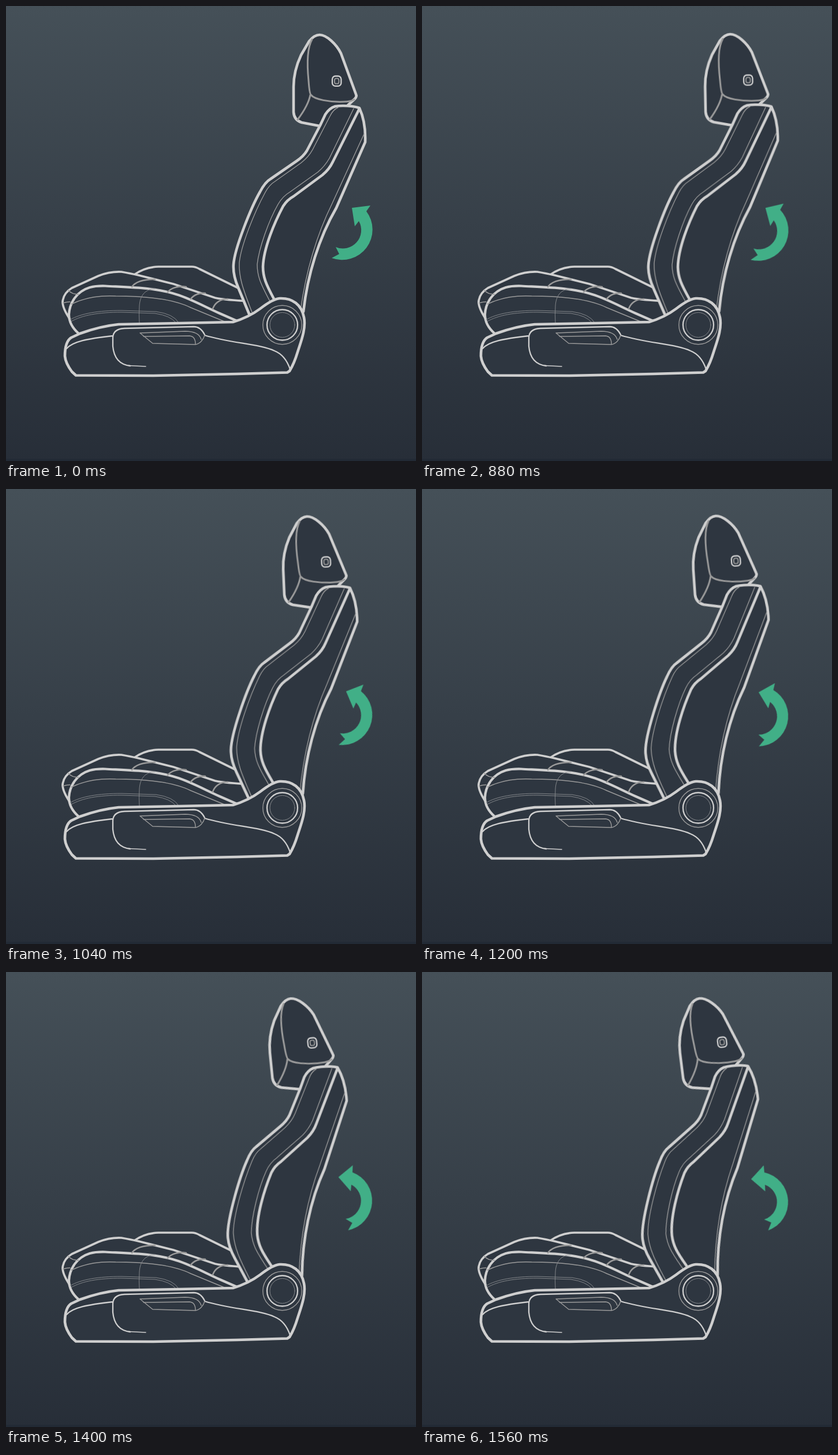
Recreate the animation shown at these times as an HTML page. Size 710 px wide and 789 px high, loop 2.08 s.

```html
<!DOCTYPE html>
<html lang="en">
<head>
<meta charset="utf-8">
<title>Seat recline</title>
<style>
  html, body { margin: 0; width: 100%; height: 100%; overflow: hidden; background: #272e38; }
  svg { display: block; width: 710px; height: 789px; }
  path, circle, rect { stroke-linecap: round; stroke-linejoin: round; }
  .line { fill: none; stroke: #cfcfcf; }
  .body { fill: #2e3640; stroke: #cfcfcf; }
  .thick { stroke-width: 4.6; }
  .mid { stroke-width: 3.7; }
  .fine { stroke-width: 2.3; }
  .seam { fill: none; stroke: #9a9a9a; stroke-width: 2.6; }
  .thin { fill: none; stroke: #9a9a9a; stroke-width: 1.4; }
  .hair { fill: none; stroke: #8d8f92; stroke-width: .9; }

  .back, .arrow { animation: 2080ms steps(20, end) infinite; }
  .back { transform-origin: 478px 553px; animation-name: recline; }
  .arrow { transform-origin: 584px 389.5px; animation-name: turn; }
  @keyframes recline {
    0%, 36.52% { transform: rotate(0deg); }
    74.98%, 100% { transform: rotate(-7.1deg); }
  }
  @keyframes turn {
    0%, 36.52% { transform: translateY(0) rotate(0deg); }
    74.98%, 100% { transform: translateY(9.5px) rotate(-40.3deg); }
  }
</style>
</head>
<body>
<svg viewBox="0 0 710 789">
  <defs>
    <linearGradient id="sky" x1="0" y1="0" x2="0" y2="1">
      <stop offset="0" stop-color="#455058"/>
      <stop offset="1" stop-color="#272e38"/>
    </linearGradient>
  </defs>
  <rect width="710" height="789" fill="url(#sky)"/>
  <rect y="785" width="710" height="4" fill="#222a35"/>

  <!-- cushion -->
  <path class="body mid" d="M222 466Q240 453 264 452H322Q328 452 335 456L402 489L430 520H300Z"/>
  <path class="body mid" d="M126 568L112 545C103 532 98 521 98 513C99 502 104 495 114 489L160 468Q180 460 200 461Q212 463 230 467L290 482L320 492L362 506Q380 510 425 512L420 550Z"/>
  <path class="body thick" style="stroke-width:4.2" d="M126 568C112 556 109 545 109 535C110 515 122 495 145 488Q156 485 172 485.500C200 487 225 488 245 490C300 496 320 510 370 533L402 547"/>
  <path class="seam" d="M218 487C225 477 240 474 258 474M280 496C287 488 300 485 312 487M320 508C325 501 335 497 345 498M358 525C362 514 372 508 384 508"/>
  <path class="thin" d="M113 517C140 504 165 502 190 503C240 503 290 508 320 523L378 547M108 493Q114 500 126 500M99 515Q105 513 111 513"/>
  <path class="hair" d="M258 490C240 491 232 503 231 520Q230 535 231 551M111 544C130 533 160 528 200 528L260 530Q290 534 299 549M113 547C132 536 160 531 200 531L258 533Q285 537 294 549"/>

  <!-- backrest -->
  <g class="back">
    <path class="body thick" d="M543 50C555 50 572 66 580 82L606 153Q608 157 604 161L590 174L543 208L512 202Q499 198 498 184V140C498 120 503 102 511 85L525 61Q534 50 543 50Z"/>
    <path class="seam" style="stroke-width:3" d="M530 58C522 72 521 100 524 130C525 145 526 152 528 154C534 162 560 167 585 166Q597 166 603 162M527 154C524 170 514 185 505 197"/>
    <rect class="line fine" x="565" y="121.5" width="15.4" height="17.4" rx="5.5"/>
    <rect class="seam" style="stroke-width:1.8" x="569" y="125.7" width="7.4" height="9" rx="2.8"/>
    <path class="body thick" d="M421 534L402 488C396 474 393 462 394 448C396 420 424 350 440 322Q449 305 458 300L503 269Q515 261 521 251L544 207L553 188Q560 177 570 174C582 172 602 173 612 177C618 190 623 210 622 236L572 350C542 402 522 466 515 530L480 555Z"/>
    <path class="thin" d="M575 176Q566 180 561 191L531 249Q524 262 511 272L466 304Q456 310 449 323C430 358 407 415 404 445C403 470 410 490 426 531M602 178L560 264Q552 278 540 288L491 323Q479 330 471 344C455 372 438 420 435 448C435 468 440 480 457 512M620 222L565 342C539 395 520 455 510 528"/>
    <path class="line thick" d="M612 178L566 270Q560 283 548 293L498 330Q487 336 480 347C465 375 446 420 445 452C445 470 450 482 464 508"/>
  </g>

  <!-- base -->
  <path class="body thick" d="M121 640.500L114 634Q103 619 102 607C102 592 105 580 113 575L128 568C150 560 175 554 195 552L300 550L393 548Q420 540 440 525Q462 508 474 507C496 506 512 518 516 540C520 560 510 584 505 600Q499 620 491 633L487 635.500L400 638L255 641Z"/>
  <path class="line fine" d="M105 594C115 582 140 577 185 572M344 570Q337 556 325 556L205 559Q185 560 185 576V590C187 612 198 622 215 624M344 571C390 585 440 586 465 598C480 604 488 618 492 630"/>
  <path class="line" stroke-width="1.5" d="M212 623.5L242 625"/>
  <path class="thin" d="M344 571C342 578 336 586 328 587L254 585L232 567L310 564Q334 564 338 578M238 573L318 572Q328 573 328 586"/>
  <circle class="thin" cx="478.5" cy="553" r="33.7"/>
  <circle class="line fine" cx="478.5" cy="553" r="26.5"/>
  <circle class="hair" cx="478.5" cy="553" r="21.5"/>

  <path class="arrow" fill="#41af87" d="M564 437L577 430L571 418A31.8 31.8 0 0 0 611 373L604 382L599 350L631 346L624 356A52.5 52.5 0 0 1 564 437Z"/>
</svg>
</body>
</html>
```
